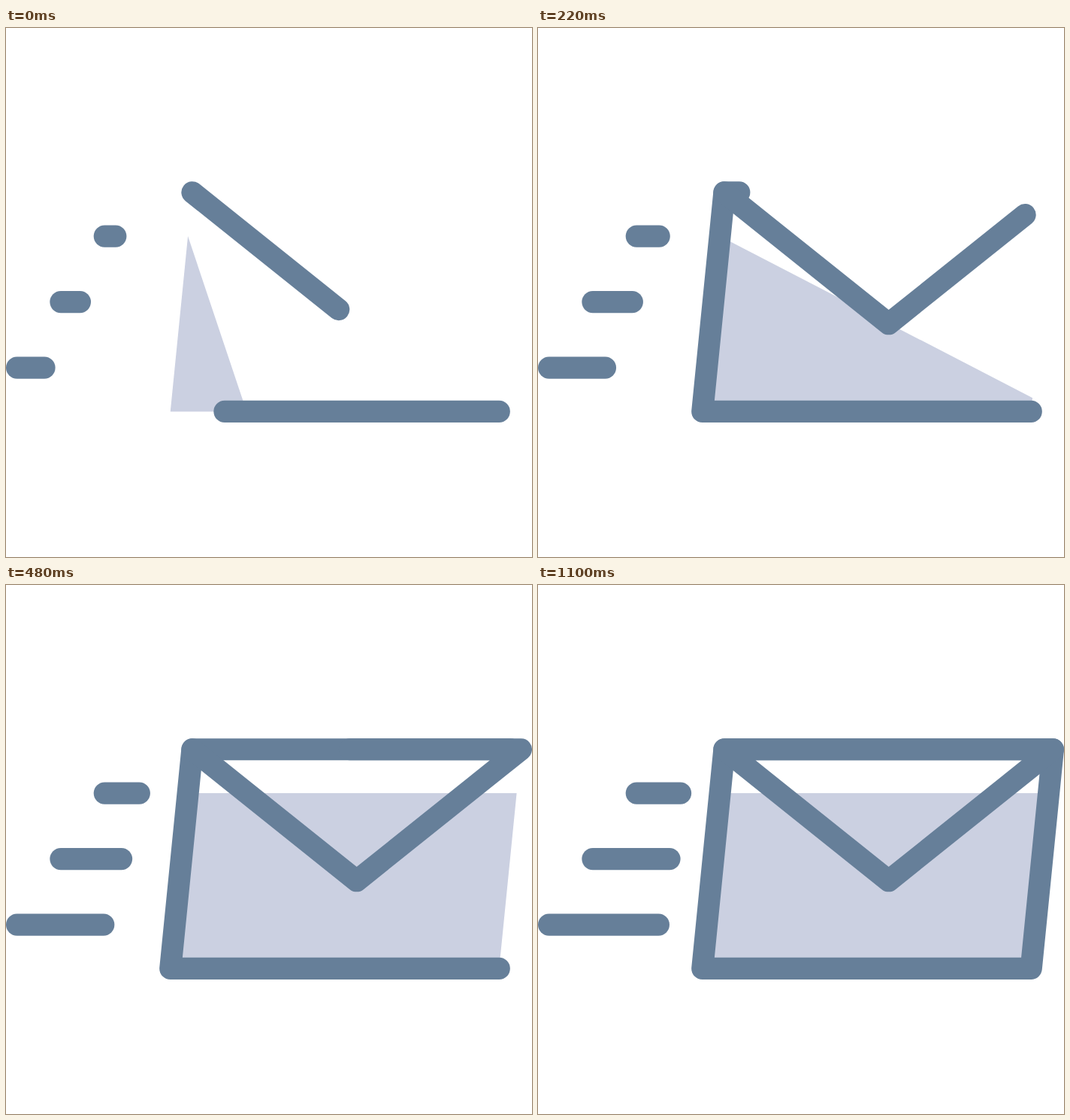
These frames come from a looping animation (700x704 px, 1.6 s). An HTML page:

```html
<!DOCTYPE html>
<html lang="en">
<head>
<meta charset="utf-8">
<title>Sending mail</title>
<style>
  html, body { margin: 0; width: 100%; height: 100%; overflow: hidden; background: #fff; }
  svg { display: block; width: 700px; height: 704px; }
  .line { fill: none; stroke: #667f99; stroke-width: 2; stroke-linecap: round; stroke-linejoin: round; }
  .paper { fill: #cbd0e1; }
</style>
</head>
<body>
<svg viewBox="0 0 700 704"><g id="art" transform="scale(14.58333)"></g></svg>
<script>
const LOOP = 1600, STEP = 20;

// Drawn share of every path over time: [ms, share]
const KEYS = [[0, 0.25], [160, 0.4346], [280, 0.5911], [480, 0.79],
              [660, 0.9043], [820, 0.9643], [1100, 1]];

const SHAPES = [
  { kind: 'paper', closed: true, pts: [[16.6, 19], [15, 35], [45, 35], [46.6, 19]] },
  { kind: 'line', closed: true, pts: [[45, 35], [15, 35], [17, 15], [47, 15]] },
  { kind: 'line', closed: true, pts: [[17, 15], [32, 27], [47, 15]] },
  { kind: 'line', pts: [[9, 19], [13, 19]] },
  { kind: 'line', pts: [[5, 25], [12, 25]] },
  { kind: 'line', pts: [[1, 31], [11, 31]] }
];

const dist = (a, b) => Math.hypot(b[0] - a[0], b[1] - a[1]);
const span = i => KEYS[i + 1][0] - KEYS[i][0];
const rate = i => (KEYS[i + 1][1] - KEYS[i][1]) / span(i);

// Smooth speed at each key, coming to rest at the last one
const speeds = KEYS.map((_, i) => {
  if (i === KEYS.length - 1) return 0;
  if (i === 0) return rate(0) - span(0) * (rate(1) - rate(0)) / (span(0) + span(1));
  return (rate(i - 1) * span(i) + rate(i) * span(i - 1)) / (span(i - 1) + span(i));
});

function progress(ms) {
  const next = KEYS.findIndex(k => k[0] > ms);
  if (next < 0) return 1;
  const i = next - 1, h = span(i), u = (ms - KEYS[i][0]) / h, v = 1 - u;
  return KEYS[i][1] * (1 + 2 * u) * v * v + speeds[i] * h * u * v * v
       + KEYS[next][1] * u * u * (3 - 2 * u) - speeds[next] * h * u * u * v;
}

// Path data for the first part of a polyline
function trim({ pts, closed }, share) {
  if (share >= 1) return 'M' + pts.join('L') + (closed ? 'Z' : '');
  const all = closed ? [...pts, pts[0]] : pts;
  const total = all.slice(1).reduce((sum, p, i) => sum + dist(all[i], p), 0);
  const out = [all[0]];
  let left = total * share;
  for (let i = 1; i < all.length; i++) {
    const a = all[i - 1], b = all[i], len = dist(a, b);
    const k = Math.min(1, left / len);
    out.push([a[0] + (b[0] - a[0]) * k, a[1] + (b[1] - a[1]) * k]);
    left -= len;
    if (left <= 0) break;
  }
  return 'M' + out.join('L');
}

const art = document.getElementById('art');
const paths = SHAPES.map(shape => {
  const path = document.createElementNS('http://www.w3.org/2000/svg', 'path');
  path.setAttribute('class', shape.kind);
  return art.appendChild(path);
});

function draw(ms) {
  const share = progress(Math.floor(ms / STEP) * STEP);
  SHAPES.forEach((shape, i) => paths[i].setAttribute('d', trim(shape, share)));
}

const start = performance.now();
function tick() {
  draw((performance.now() - start) % LOOP);
  requestAnimationFrame(tick);
}
tick();
</script>
</body>
</html>
```
